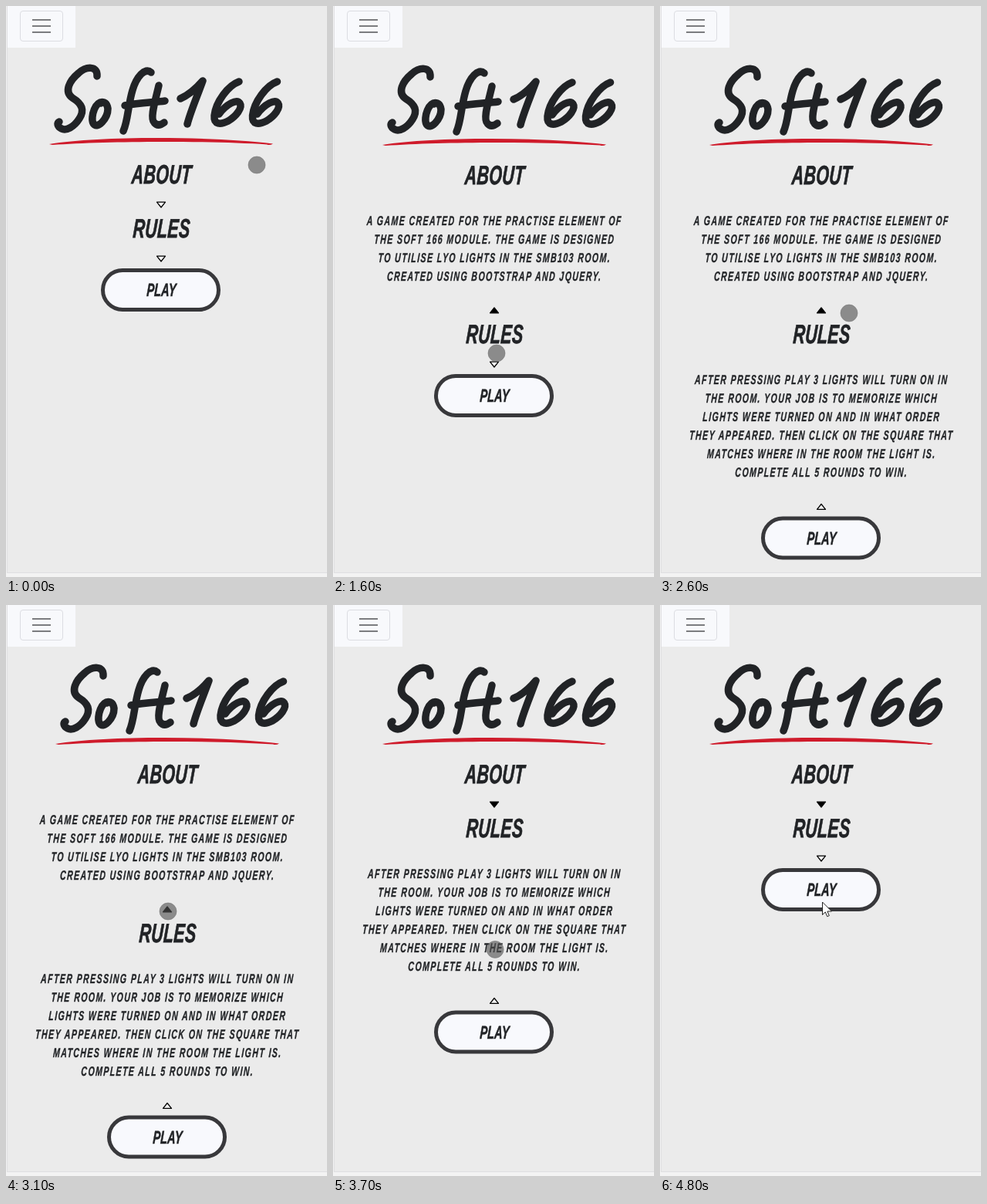
An HTML page that plays this animation: 416x740 px, repeating every 5 s.

```html
<!DOCTYPE html>
<html lang="en">
<head>
<meta charset="utf-8">
<title>Soft166</title>
<style>
html, body { margin: 0; width: 100%; height: 100%; overflow: hidden; background: #f3f3f3; }
svg { display: block; width: 416px; height: 740px; }
text {
  font: italic bold 17px "Liberation Sans", Arial, sans-serif;
  letter-spacing: 2.3px; text-anchor: middle;
  fill: #212326; stroke: #212326; stroke-width: .35px;
}
.head { font-size: 34.5px; letter-spacing: .5px; stroke-width: .8px; }
.play { font-size: 23.5px; letter-spacing: .2px; stroke-width: .6px; }
.ink { fill: none; stroke: #212326; stroke-width: 9.5; stroke-linecap: round; stroke-linejoin: round; }
.arrow { stroke: #000; stroke-width: 1.3; stroke-linejoin: round; }
</style>
</head>
<body>
<svg viewBox="0 0 416 740">
  <defs>
    <clipPath id="aboutClip"><rect x="0" y="247" width="416"/></clipPath>
    <clipPath id="rulesClip"><rect x="0" y="317" width="416"/></clipPath>
    <path id="six" d="M310 99C296 104 280 125 278 143C277 155 286 155 296 150C306 144 315 133 311 127C307 121 294 128 284 141"/>
  </defs>
  <rect x="1.5" y="-2" width="420" height="736.5" fill="#ebebeb" stroke="#dfdfe1"/>
  <rect x="2" width="88" height="54" fill="#f8f9fc"/>
  <rect x="18.5" y="6.5" width="55" height="39" rx="3.5" fill="none" stroke="#dcdde2"/>
  <path d="M34 18H58M34 26H58M34 34H58" stroke="#7b7c7f" stroke-width="2"/>

  <g id="page">
    <g class="ink" role="img" aria-label="Soft166">
      <path d="M126 92C127 78 112 79 102 88C90 98 83 112 94 120C107 128 110 136 103 147C96 158 86 163 80 160C74 157 74 152 77 151"/>
      <path d="M135 126C124 122 117 145 121 153C127 162 140 146 140 134C139 127 135 124 131 127"/>
      <path d="M196 87C188 80 177 93 172 110C166 130 166 150 160 163M162 130C180 126 200 126 214 124"/>
      <path d="M206 104C202 122 194 146 200 152C204 157 209 155 213 152"/>
      <path d="M234 121C246 116 256 106 263 98C257 115 247 138 243 154"/>
      <use href="#six"/><use href="#six" x="49.5"/>
    </g>
    <path d="M64 180C130 169.5 270 169.5 354 179.5Q350 182 346 180.5C270 175.5 140 175.7 68 181Z" fill="#cf1b2b"/>
    <g id="about"></g>
    <g id="rules"></g>
    <g id="play">
      <rect x="133.5" y="343.5" width="150" height="51" rx="25.5" fill="#f8f9fd" stroke="#38383b" stroke-width="5"/>
    </g>
  </g>
  <circle id="touch" r="11" fill="#505050" fill-opacity=".62" stroke="#777" stroke-opacity=".6"/>
  <path id="pointer" transform="translate(210.5 385)" d="M0 0V16.5L3.8 12.9 6.2 18.7 8.8 17.6 6.4 12H12Z" fill="#fff" stroke="#222"/>
</svg>
<script>
const LOOP = 5000, STEP = 100, SLIDE = 350;
const ABOUT_H = 136, RULES_H = 184.5;
const $ = id => document.getElementById(id);

const ABOUT = ["A GAME CREATED FOR THE PRACTISE ELEMENT OF",
  "THE SOFT 166 MODULE. THE GAME IS DESIGNED",
  "TO UTILISE LYO LIGHTS IN THE SMB103 ROOM.",
  "CREATED USING BOOTSTRAP AND JQUERY."];
const RULES = ["AFTER PRESSING PLAY 3 LIGHTS WILL TURN ON IN",
  "THE ROOM. YOUR JOB IS TO MEMORIZE WHICH",
  "LIGHTS WERE TURNED ON AND IN WHAT ORDER",
  "THEY APPEARED. THEN CLICK ON THE SQUARE THAT",
  "MATCHES WHERE IN THE ROOM THE LIGHT IS.",
  "COMPLETE ALL 5 ROUNDS TO WIN."];

// One condensed, slanted style for all comic lettering
const label = (str, y, cls = "") =>
  `<text class="${cls}" transform="matrix(.62 0 -.06 1 209 ${y})">${str}</text>`;

function section(id, title, lines, y) {
  $(id).innerHTML = label(title, y, "head") +
    `<g clip-path="url(#${id}Clip)">${lines.map((s, i) => label(s, y + 53 + 24 * i)).join("")}</g>` +
    `<path id="${id}Arrow" class="arrow" d="M-5.5 -3.3H5.5L0 3.5Z"/>`;
}
section("about", "ABOUT", ABOUT, 231);
section("rules", "RULES", RULES, 301);
$("play").insertAdjacentHTML("beforeend", label("PLAY", 377, "play"));

// The CSS "ease" curve
function ease(x) {
  if (x <= 0) return 0;
  if (x >= 1) return 1;
  let lo = 0, hi = 1;
  const curve = (u, a, b) => 3 * u * (1 - u) ** 2 * a + 3 * u * u * (1 - u) * b + u ** 3;
  for (let i = 0; i < 20; i++) {
    const mid = (lo + hi) / 2;
    if (curve(mid, .25, .25) < x) lo = mid; else hi = mid;
  }
  return curve(lo, .1, 1);
}
const open = (t, from, to) => ease((t - from) / SLIDE) - ease((t - to) / SLIDE);

// Touch path: time, x, y
const PATH = [[0, 325, 206], [600, 199, 258], [800, 198, 261], [900, 198, 261],
  [1200, 205, 335], [1500, 212, 446], [1600, 212, 450], [1800, 211.5, 455.5],
  [1900, 211.5, 462.5], [2150, 211.5, 462.5], [2600, 245, 398], [2700, 244, 398],
  [3100, 210, 397], [3400, 211, 396], [4050, 209, 510], [4250, 209, 510], [4750, 210, 396]];

function touchAt(t) {
  const i = PATH.findIndex(p => p[0] > t);
  if (i < 0) return PATH[PATH.length - 1].slice(1);
  const [a, b] = [PATH[i - 1], PATH[i]];
  const k = (t - a[0]) / (b[0] - a[0]), s = k * k * (3 - 2 * k);
  return [a[1] + (b[1] - a[1]) * s, a[2] + (b[2] - a[2]) * s];
}

const move = (id, x, y) => $(id).setAttribute("transform", `translate(${x} ${y})`);

function arrow(id, y, up, filled) {
  const el = $(id + "Arrow");
  el.setAttribute("transform", `translate(209 ${y}) scale(1 ${up ? -1 : 1})`);
  el.setAttribute("fill", filled ? "#000" : "#f4f4f4");
}

function draw(t) {
  const a = ABOUT_H * open(t, 750, 3220), r = RULES_H * open(t, 2060, 4150);
  move("page", t < 700 ? -8 : 0, t < 700 ? -1 : 0);
  move("rules", 0, a);
  move("play", 0, a + r);
  $("aboutClip").firstChild.setAttribute("height", a);
  $("rulesClip").firstChild.setAttribute("height", r);
  arrow("about", 258.5 + a, t >= 750 && t < 3220, t >= 750);
  arrow("rules", 328.5 + r, t >= 2060 && t < 4150, false);
  move("touch", ...touchAt(t));
  const left = t >= 4750;
  $("touch").style.display = left ? "none" : "";
  $("pointer").style.display = left ? "" : "none";
}

const start = performance.now();
function tick() {
  const t = (performance.now() - start) % LOOP;
  draw(Math.floor(t / STEP) * STEP);
  requestAnimationFrame(tick);
}
tick();
</script>
</body>
</html>
```
